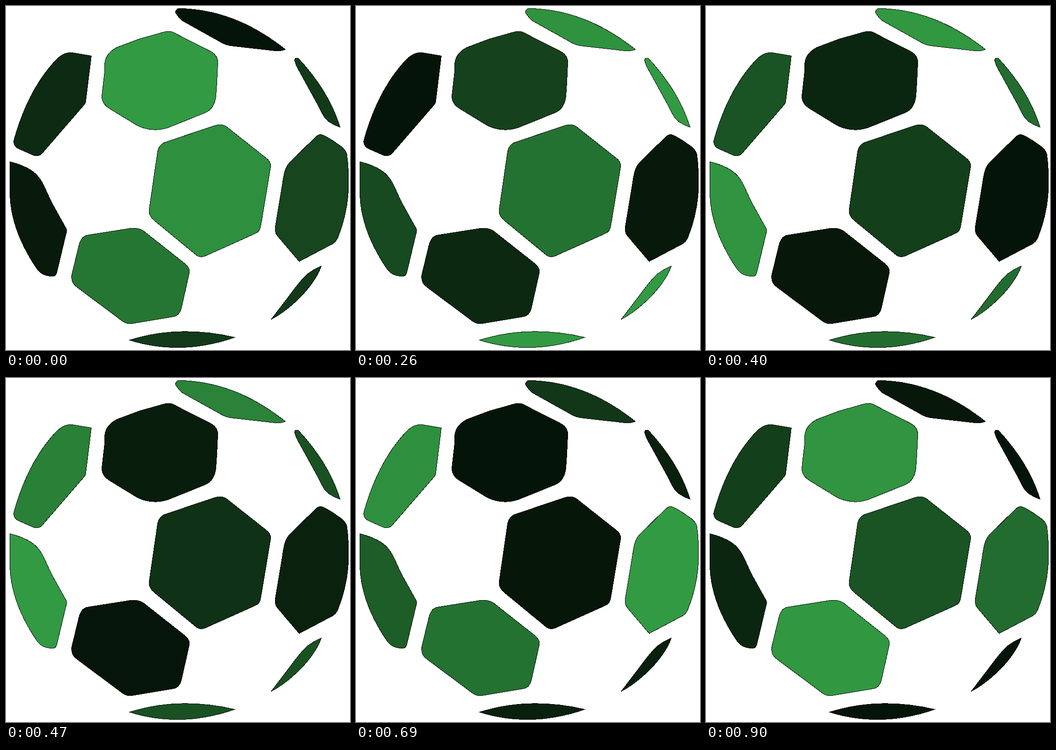
Recreate the animation shown at these times as an HTML page. Size 748 px wide and 748 px high, loop 970 ms.

```html
<!DOCTYPE html>
<html>
<head>
<meta charset="utf-8">
<title>Football</title>
<style>
html, body { margin: 0; width: 100%; height: 100%; overflow: hidden; background: #fff; }
svg { display: block; width: 100vw; height: 100vh; }
path { stroke: #000; stroke-width: 1; shape-rendering: crispEdges; }
</style>
</head>
<body>
<svg viewBox="0 0 748 748"><g id="ball" transform="translate(.5 .5)"></g></svg>
<script>
// Panels in the order the light reaches them
const panels = [
  `M627 117Q628 111 635 113Q702 185 726 263Q700 254 691 240Q685 231 680 219L636 139Q629 127 627 117Z
   M685 565Q658 577 647 590Q634 604 612 634L576 681Q609 664 644 628Q676 593 685 565Z
   M268 726Q376 692 497 720Q380 761 268 726Z`,
  'M373 5Q495 5 607 94Q598 98 585 97L488 86Q476 84 468 79L382 31Q376 26 368 14Q368 9 373 5Z',
  'M8 338Q54 350 70 371Q78 380 87 401Q95 420 104 436L128 479Q133 487 131 491L111 575Q109 586 103 587Q80 588 68 573Q7 484 8 400Z',
  'M185 108L144 101Q124 99 106 119Q47 183 17 290Q14 302 25 309L59 324Q70 328 78 320L168 216Q173 210 173 206Z',
  'M682 279Q690 278 720 299Q740 312 741 324C748 385 746 440 722 501Q718 511 711 516L637 555L591 501Q583 492 585 480L603 371Q606 351 616 340L671 286Q677 280 682 279Z',
  'M175 498L270 483Q288 481 299 489L389 560Q400 569 398 580L381 656Q377 672 364 675L274 690Q263 692 253 685L154 611Q139 601 143 582L158 520Q162 502 175 498Z',
  'M347 55Q360 53 371 61L444 98Q461 107 460 124L458 165L456 195Q453 222 434 231L352 264Q319 275 286 260L250 238L224 222Q207 211 208 195L214 142L214 126Q216 101 242 89L290 71Z',
  'M455 259Q469 255 479 262L565 330Q576 338 575 349L553 480Q551 490 542 494L433 543Q421 548 412 540L322 466Q309 456 311 441L329 317Q332 301 345 296Z'
];
const ball = document.getElementById('ball');
const shapes = panels.map(d => {
  const path = document.createElementNS('http://www.w3.org/2000/svg', 'path');
  path.setAttribute('d', d);
  return ball.appendChild(path);
});

const LOOP = 970, PULSE = 1000;
const ticks = [0, 60, 130, 200, 260, 330, 400, 470, 550, 620, 690, 760, 830, 900];
// Green level through one pulse: [ms, level]
const pulse = [[0, 58], [10, 74], [25, 83], [50, 104], [65, 114], [130, 145], [190, 154], [260, 154],
  [315, 144], [375, 118], [440, 93], [505, 67], [565, 55], [640, 39], [690, 32], [755, 25],
  [810, 22], [875, 20], [955, 20], [1000, 58]];
const dark = [5, 19, 8], bright = [50, 155, 67];

function level(ms) {
  const i = pulse.findIndex(p => p[0] > ms);
  const [t0, v0] = pulse[i - 1], [t1, v1] = pulse[i];
  return v0 + (v1 - v0) * (ms - t0) / (t1 - t0);
}

function draw(now) {
  const time = now % LOOP;
  const tick = ticks.filter(t => t <= time).pop();
  shapes.forEach((shape, i) => {
    const phase = (tick - i * PULSE / shapes.length + PULSE) % PULSE;
    const k = (level(phase) - dark[1]) / (bright[1] - dark[1]);
    const rgb = dark.map((c, j) => Math.round(c + (bright[j] - c) * k));
    shape.setAttribute('fill', `rgb(${rgb})`);
  });
}

const start = performance.now();
function loop() {
  draw(performance.now() - start);
  requestAnimationFrame(loop);
}
loop();
</script>
</body>
</html>
```
